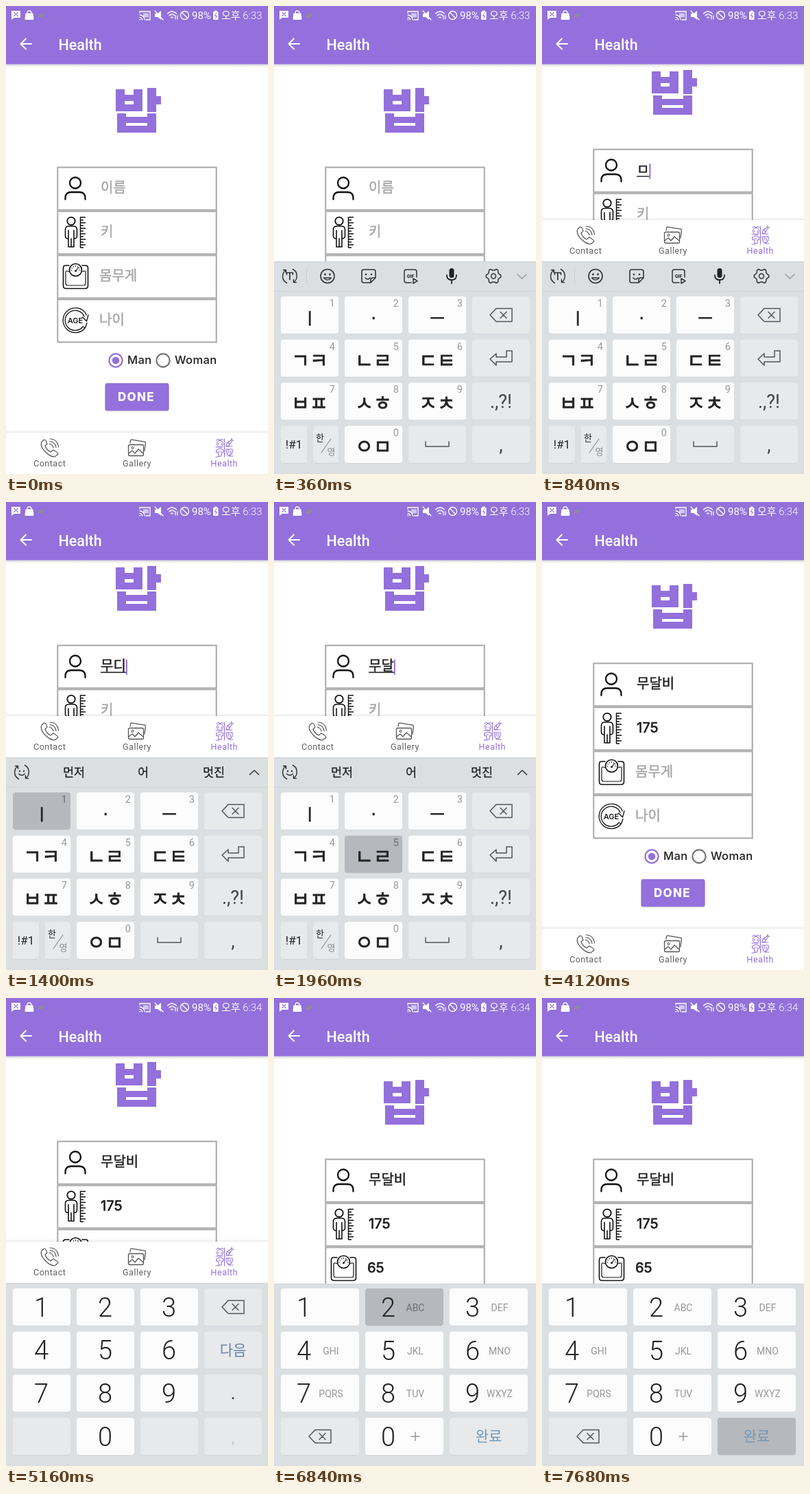
Recreate the animation shown at these times as an HTML page. Size 382 px wide and 680 px high, loop 7.72 s.

```html
<!DOCTYPE html>
<html lang="ko">
<head>
<meta charset="utf-8">
<title>Health form</title>
<style>
html, body { margin: 0; width: 100%; height: 100%; overflow: hidden; background: #fff; }
svg { display: block; width: 382px; height: 680px; }
text { font-family: Roboto, 'Noto Sans CJK KR', 'Noto Sans KR', sans-serif; fill: #222; }
.form text { font: 500 20px Inter, 'Noto Sans CJK KR', 'Noto Sans KR', sans-serif; fill: #1c1c1c; }
.form .value { stroke: #1c1c1c; stroke-width: .4px; }
.form .hint { font-weight: 400; fill: #a4a4a4; stroke: #a4a4a4; stroke-width: .4px; }
.form .radio { font-size: 16.5px; letter-spacing: .4px; }
.form .done { font-size: 17px; font-weight: 800; letter-spacing: 1.3px; fill: #fff; }
.form .age { font-size: 11px; font-weight: 600; }
.line { fill: none; stroke-linecap: round; stroke-linejoin: round; }
.mid { text-anchor: middle; }
.end { text-anchor: end; }
.bar text { fill: #fff; }
.nav text { font-size: 12.5px; letter-spacing: .5px; fill: #5f5f5f; }
.nav .on { fill: #9370db; }
.key { fill: #fcfcfc; }
.fn { fill: #e7e9eb; }
.key.down { fill: #b5b8bc; }
.jamo, .vowel { font-size: 29px; stroke: #222; stroke-width: .8px; }
.vowel { font-size: 23px; }
.mark { font-size: 27px; fill: #444; }
.num { font-size: 38px; font-weight: 300; }
.sub { font-size: 14.5px; fill: #0006; }
.abc { font-size: 14px; fill: #0006; }
.next { font-size: 21px; fill: #6682ac; }
.word { font-size: 17.5px; stroke: #222; stroke-width: .3px; }
.small { font-size: 13px; }
</style>
</head>
<body>
<svg id="stage" viewBox="0 0 382 680"></svg>
<script>
const PURPLE = '#9370db', INK = '#111', LOOP = 7720, STEP = 40;
const COLS = [10, 103, 196, 289], ROWS = [422, 484.7, 547.3, 610];

const rect = (x, y, w, h, fill, r = 0) =>
  `<rect x="${x}" y="${y}" width="${w}" height="${h}" rx="${r}" fill="${fill}"/>`;
const line = (d, color = INK, width = 2) =>
  `<path class="line" d="${d}" stroke="${color}" stroke-width="${width}"/>`;
const ring = (x, y, r, color = INK, width = 2) =>
  `<circle class="line" cx="${x}" cy="${y}" r="${r}" stroke="${color}" stroke-width="${width}"/>`;
const dot = (x, y, r, fill) => `<circle cx="${x}" cy="${y}" r="${r}" fill="${fill}"/>`;
const text = (x, y, s, cls = '', id = '') =>
  `<text x="${x}" y="${y}" class="${cls}"${id && ` id="${id}"`}>${s}</text>`;
const range = n => [...Array(n).keys()];

// Form
const title = () => `<g role="img" aria-label="밥" fill="${PURPLE}" fill-rule="evenodd">
  <path d="M160 121h13v8h13v-8h13v32h-39zM173 138v5h13v-5z"/>
  <path d="M206 119h13v12h7v12h-7v11h-13z"/>
  <path d="M162 156h13v5h31v-5h13v28h-57zM175 170v4h31v-4z"/></g>`;

const personIcon = () => ring(101, 257, 8, INK, 2.3) +
  line('M86.5 281v-2q0-8.5 8.5-8.5h12q8.5 0 8.5 8.5v2', INK, 2.3);

const heightIcon = () => ring(95, 312.5, 5.7, INK, 1.8) +
  line('M91 350v-12q-4.5 0-4.5-4v-9q0-5 5-5h7q5 0 5 5v9q0 4-4.5 4v12zM91 326v12M99 326v12M95 338v12', INK, 1.6) +
  line('M108.5 307v44' + range(12).map(i => `M108.5 ${307 + i * 4}h${i % 2 ? 4 : 7}`).join(''), INK, 1.5);

const scaleIcon = () =>
  line('M92 377h-5q-3.5 0-3.5 3.5v26q0 4 4 4h28q4 0 4-4v-26q0-3.5-3.5-3.5h-5', INK, 1.6) +
  line('M92 386q-4-2-5 0v16q0 4 3 4h23q3 0 3-4v-16q-1-2-5 0', INK, 1.2) +
  ring(101.5, 383.5, 9, INK, 1.6) + dot(101.5, 385, 1.4, INK) + line('M101.5 385l4-5', INK, 1.2) +
  range(7).map(i => {
    const a = Math.PI * (1 + i / 6), c = Math.cos(a), s = Math.sin(a);
    return line(`M${101.5 + 5.5 * c} ${384 + 5.5 * s}l${c} ${s}`, INK, 1);
  }).join('');

const ageIcon = () =>
  line('M117.5 449a18 18 0 1 0-2 18.5M114 451a14.500 14.500 0 1 0-2 15M111.500 452l6 6 2.500-9M112 466l3.500 1.500 2.500-7', INK, 1.3) +
  text(101, 460.5, 'AGE', 'age mid');

const HINTS = [[138, '이름'], [138, '키'], [136, '몸무게'], [136, '나이']];
const form = () => `<g class="form" id="form">` + title() +
  HINTS.map(([x, s], i) => {
    const y = 234.4 + 64 * i;
    return `<rect x="75.3" y="${y}" width="231.4" height="62" fill="#fff" stroke="#a9a9a9" stroke-width="2"/>` +
      text(x, y + 36.6, s, 'hint', 'hint' + i) + text(x, y + 36.6, '', 'value', 'value' + i);
  }).join('') +
  personIcon() + heightIcon() + scaleIcon() + ageIcon() +
  `<path id="under" stroke="${INK}" stroke-width="1.3"/>` +
  `<rect id="caret" y="255" width="2" height="22" fill="${PURPLE}"/>` +
  ring(160, 515, 9.6, PURPLE, 2.2) + dot(160, 515, 5.2, PURPLE) + text(177, 520, 'Man', 'radio') +
  ring(229, 515, 9.6, '#757575', 2.2) + text(246, 520, 'Woman', 'radio') +
  rect(144, 549, 94, 40.5, '#0002', 4) + rect(144.5, 548, 93, 40, PURPLE, 3) +
  text(163, 573.5, 'DONE', 'done') + '</g>';

// App bar and bottom navigation
const statusIcons = () =>
  `<path d="M8 7h13v10h-9l-4 3z" fill="#fff"/>` + line('M12 9.500l5 5M17 9.500l-5 5', PURPLE, 1.2) +
  `<path d="M28.500 10.500h11l1 8q0 1.500-1.500 1.500h-10q-1.500 0-1.500-1.500z" fill="#fff"/>` +
  line('M31 12v-2q0-3 3-3t3 3v2', '#fff', 1.3) +
  `<text x="47" y="16" style="font:italic 700 7px Roboto,sans-serif;fill:#8aa06a">gif</text>` +
  line('M195 10v-2h15v12h-6M195 13a7 7 0 0 1 7 7M195 16.500a3.500 3.500 0 0 1 3.500 3.500', '#fff', 1.3) +
  rect(200, 10.5, 8, 6, '#fff9') + dot(195.5, 19.5, 1, '#fff') +
  `<path d="M217 11h4l5-4v13l-5-4h-4z" fill="#fff"/>` + line('M217 7l12 13', '#fff', 1.3) +
  line('M235.500 11q6.500-6 13 0M238 14q4-4 8 0M240.500 17q1.500-1.500 3 0M247 14v5M250 19v-5', '#fff', 1.3) +
  ring(260.5, 13.5, 6, '#fff', 1.3) + line('M256.500 9.500l8 8', '#fff', 1.3) +
  rect(302, 8, 7.5, 12, '#fff', 1) + rect(304, 6.5, 3.5, 2, '#fff') + line('M306.500 10.500l-2 4h3l-2 3.500', PURPLE, 1);

const bar = () => `<g class="bar">` +
  rect(0, 84.6, 382, 4.5, 'url(#shade)') + rect(0, 0, 382, 84.6, PURPLE) + statusIcons() +
  `<text x="271" y="19" font-size="15">98%</text>
   <text x="314" y="19" font-size="15" font-weight="300" id="clock"></text>
   <text x="76.5" y="63.5" font-size="21.5" font-weight="500">Health</text>` +
  line('M37 55H22M29 47.500L21.500 55l7.500 7.500', '#fff', 2) + '</g>';

const healthIcon = () => {
  const p = d => line(d, PURPLE, 1.1);
  return ring(312, 636, 4.5, PURPLE, 1.1) + p('M307 631q3-3 5 0 3-3 5 0M310 635v2M314 636v2M306 641h10') +
    p('M318.500 629v26M321 640l1-5 7-5 1 1-5 8zM329 630v-2M330 631h2M324 635l2 2M322 640h8') +
    p('M306.500 647q0-3 3-3 3-2 5 0 3 0 2.500 3 0 2-3 2v5h-4v-5q-3.500 0-3.500-2zM310 647h3') +
    p('M321 644h9q1 7-4 9-5 0-5-9zM324 644v5M327 646v4M324 654h7M306 655h5');
};
const nav = () => `<g class="nav" id="nav">` +
  rect(0, 617, 382, 3, '#0000000a') + rect(0, 619, 382, 1, '#0000000c') + rect(0, 620, 382, 60, '#fff') +
  line('M56 630l-4 3c-4 8 10 22 19 22l5-4q0-2-7-6l-4 3q-6-3-8-9l3-3q-2-6-4-6zM63 636q5 1 6 6M64 632.500q8 1 9 9M64 629q11 0 12.500 12', '#555', 1.2) +
  line('M180.500 637.500h18q2 0 2 2v12q0 2-2 2h-18q-2 0-2-2v-12q0-2 2-2zM181 635l.5-3.500q.3-1.700 2-1.400l18.500 3q1.700.3 1.400 2l-1.400 11', '#555', 1.3) +
  line('M179 650l5-4 4 4 5-6 7 6', '#555', 1.3) +
  ring(184.5, 642, 1.5, '#555', 1.1) + healthIcon() +
  text(63.7, 669, 'Contact', 'mid') + text(191, 669, 'Gallery', 'mid') + text(318.3, 669, 'Health', 'mid on') + '</g>';

// Keyboards
const key = (id, x, row, label, fn, w = 84) =>
  rect(x + .5, ROWS[row] + 1, w - 1, 53.7, '#cfd2d5', 4) +
  `<rect class="key${fn ? ' fn' : ''}" id="${id}" x="${x}" y="${ROWS[row]}" width="${w}" height="54" rx="4"/>` + label;
const eraser = (x, y) =>
  line(`M${x - 16} ${y}l9-9.5h23v19h-23zM${x - 1} ${y - 4.5}l9 9M${x + 8} ${y - 4.5}l-9 9`, '#555', 1.5);
const board = (id, top, body) =>
  `<g id="${id}">` + rect(0, top, 382, 680 - top, '#dcdfe2') + rect(0, top, 382, 1, '#cfd2d5') + body + '</g>';

const JAMO = ['ㅣ', 'ㆍ', 'ㅡ', 'ㄱㅋ', 'ㄴㄹ', 'ㄷㅌ', 'ㅂㅍ', 'ㅅㅎ', 'ㅈㅊ', 'ㅇㅁ'];
const place = i => i < 9 ? [i % 3, i / 3 | 0] : [1, 3];

const gear = (x, y) => line('M' + range(24).map(i => {
  const a = (i - .5) * Math.PI / 12, r = i % 4 < 2 ? 10.8 : 8.6;
  return `${x + r * Math.cos(a)} ${y + r * Math.sin(a)}`;
}).join('L') + 'z', '#333', 1.5) + ring(x, y, 3.4, '#333', 1.5);

const tools = () => {
  const ink = '#333';
  return line('M18.500 402.500A11 11 0 0 1 17 384M13.500 383.500h4v4M27.500 382.500A11 11 0 0 1 29 401M32.500 401.500h-4v-4', ink, 1.5) +
    `<g id="tools">` + line('M18.500 390v-2.500h9v2.500M23 388v9.500', ink, 1.7) + rect(47, 381, 1, 24, '#cdd0d3') +
    ring(78, 392.5, 10, ink, 1.6) + dot(74.5, 390, 1.4, ink) + dot(81.5, 390, 1.4, ink) + line('M72.500 395q5.500 6 11 0z', ink, 1.4) +
    line('M131 383h14q3 0 3 3v9l-7 7h-10q-3 0-3-3v-13q0-3 3-3zM148 395h-4q-3 0-3 3v4M133 395q4 4 7 0', ink, 1.6) +
    dot(134, 390, 1.3, ink) + dot(142, 390, 1.3, ink) +
    line('M200 402h-7q-3 0-3-3v-13q0-3 3-3h12q3 0 3 3v8M203 396l6 3.500-6 3.500z', ink, 1.5) +
    `<text class="mid" x="199" y="395" font-size="7" font-weight="700">GIF</text>` +
    rect(255.5, 381, 7, 14, '#222', 3.5) + line('M252 391q0 7 7 7t7-7M259 398v5', '#222', 1.8) +
    gear(320, 392.5) + line('M355 390l6.500 6 6.500-6', '#999', 1.5) + '</g>' +
    `<g id="words">` + dot(20, 391, 1.2, ink) + dot(26, 391, 1.2, ink) + line('M18.500 395q4.500 4 9 0', ink, 1.4) +
    text(99, 399, '먼저', 'word mid') + text(200, 399, '어', 'word mid') + text(303, 399, '멋진', 'word mid') +
    line('M355.500 396l6.500-6 6.500 6', ink, 1.6) + '</g>';
};

const hangul = () => board('hangul', 371, rect(0, 414, 382, 1, '#d3d6d9') + tools() +
  JAMO.map((s, i) => {
    const [c, r] = place(i), x = COLS[c], y = ROWS[r], n = (i + 1) % 10;
    const label = i < 3 ? text(x + 42, y + 40, s, 'vowel mid') : text(x + 42, y + 41, s, 'jamo mid');
    return key('k' + n, x, r, label + text(x + 79, y + 15, n, 'sub end'));
  }).join('') +
  key('kDel', 289, 0, eraser(331, 449), 1) +
  key('kEnter', 289, 1, line('M315 513l9-8v5h15v-9h8v16h-23v5z', '#555', 1.5), 1) +
  key('kMark', 289, 2, text(331, 584, '.,?!', 'mark mid'), 1) +
  key('kSym', 10, 3, `<text class="mid" x="29" y="643" font-size="17">!#1</text>`, 1, 38) +
  key('kLang', 57, 3, text(67, 632, '한', 'small mid') + text(83.5, 652, '영', 'sub small mid') + line('M69 649l14-20', '#777', 1), 1, 37) +
  key('kSpace', 196, 3, line('M221 633v7h34v-7', '#555', 1.5), 1) +
  key('kComma', 289, 3, text(331, 647, ',', 'mark mid'), 1));

const digits = () => board('digits', 414,
  range(10).map(i => {
    const [c, r] = place(i), n = (i + 1) % 10;
    return key('d' + n, COLS[c], r, text(COLS[c] + 41.5, ROWS[r] + 40.5, n, 'num mid'));
  }).join('') +
  key('dDel', 289, 0, eraser(331, 449), 1) + key('dNext', 289, 1, text(331, 519, '다음', 'next mid'), 1) +
  key('dDot', 289, 2, text(331, 583, '.', 'mark mid'), 1) + key('dA', 10, 3, '', 1) + key('dB', 196, 3, '', 1) +
  key('dC', 289, 3, `<text class="mid" x="331" y="647" font-size="24" style="fill:#c3c6ca">,</text>`, 1));

const LETTERS = ['', 'ABC', 'DEF', 'GHI', 'JKL', 'MNO', 'PQRS', 'TUV', 'WXYZ', '+'];
const phone = () => board('phone', 415,
  LETTERS.map((s, i) => {
    const [c, r] = place(i), x = 10 + 123 * c, y = ROWS[r], n = (i + 1) % 10;
    const sub = s === '+'
      ? line(`M${x + 67} ${y + 27}h12m-6-6v12`, '#999', 1.5)
      : text(x + 73, y + 33, s, 'abc mid');
    return key('p' + n, x, r, text(x + 33.5, y + 41, n, 'num mid') + sub, 0, 114);
  }).join('') +
  key('pDel', 10, 3, eraser(67, 637), 1, 114) +
  key('pDone', 256, 3, `<text class="mid" x="313" y="644" font-size="21" style="fill:#7098b5">완료</text>`, 1, 114));

const stage = document.getElementById('stage');
stage.innerHTML = `<defs><linearGradient id="shade" x2="0" y2="1">
  <stop stop-color="#000" stop-opacity=".15"/><stop offset="1" stop-color="#000" stop-opacity="0"/>
  </linearGradient></defs>` + rect(0, 0, 382, 680, '#fff') + form() + nav() + hangul() + digits() + phone() + bar();
const $ = id => document.getElementById(id);

// Timeline, in ms
const TYPED = [
  [[640, 'ㅇ'], [760, 'ㅁ'], [960, '므'], [1080, '무'], [1240, '무ㄷ'], [1400, '무디'], [1520, '무다'],
   [1720, '무단'], [1960, '무달'], [2080, '무달ㅂ'], [2160, '무달비']],
  [[3360, '1'], [3440, '17'], [3560, '175']],
  [[4960, '6'], [5080, '65']],
  [[6840, '2'], [7200, '25']]
];
const PRESSES = [
  ['k0', 640, 720], ['k0', 760, 840], ['k3', 960, 1040], ['k2', 1080, 1160], ['k6', 1240, 1320],
  ['k1', 1400, 1480], ['k2', 1520, 1600], ['k5', 1720, 1800], ['k5', 1960, 2040], ['k7', 2080, 2160],
  ['k1', 2160, 2240], ['kEnter', 2480, 2560],
  ['d1', 3360, 3400], ['d7', 3440, 3520], ['d5', 3560, 3600], ['dNext', 3760, 3840],
  ['d6', 4960, 5040], ['d5', 5080, 5160], ['dNext', 5280, 5400],
  ['p2', 6840, 6880], ['p5', 7200, 7240], ['pDone', 7600, LOOP]
];
const LIFT = [[0, 0], [400, 309], [2560, 266], [4000, 0], [4680, 266], [5480, 0]];
const FOCUS = [[0, 400, 2560], [1, 2640, 4360]];

const last = (steps, t) => steps.filter(s => s[0] <= t).pop();
const glide = (t, a, b) => 1 - (1 - Math.min(1, Math.max(0, (t - a) / (b - a)))) ** 3;
const within = (t, a, b) => t >= a && t < b;
const shift = (id, y) => $(id).setAttribute('transform', `translate(0 ${y})`);
const show = (id, on) => $(id).setAttribute('visibility', on ? 'inherit' : 'hidden');

function draw(t) {
  const lift = last(LIFT, t)[1];
  shift('nav', -lift);
  shift('form', lift ? -26 : 0);

  show('hangul', t < 2560);
  shift('hangul', 312 * (1 - glide(t, 0, 360)));
  show('digits', within(t, 2560, 4120) || within(t, 4320, 5480));
  shift('digits', 268 * (t < 4200 ? glide(t, 3960, 4120) : 1 - glide(t, 4320, 4640)));
  show('phone', t >= 5480);
  show('tools', t < 1040);
  show('words', t >= 1040);
  $('clock').textContent = t < 4000 ? '오후 6:33' : '오후 6:34';

  TYPED.forEach((steps, i) => {
    const entry = last(steps, t);
    $('value' + i).textContent = entry ? entry[1] : '';
    show('hint' + i, !entry);
  });

  const nameWidth = $('value0').getComputedTextLength();
  $('under').setAttribute('d', t < 2560 && nameWidth ? `M138 273.5h${nameWidth}` : '');

  const focus = FOCUS.find(f => within(t, f[1], f[2]));
  show('caret', false);
  if (focus) {
    const [i, start] = focus, entry = last(TYPED[i], t);
    const since = t - (entry ? entry[0] : start);
    $('caret').setAttribute('x', 138 + $('value' + i).getComputedTextLength());
    $('caret').setAttribute('y', 255 + 64 * i);
    show('caret', since % 1000 < 500);
  }

  const down = new Set(PRESSES.filter(p => within(t, p[1], p[2])).map(p => p[0]));
  for (const k of stage.querySelectorAll('.key')) k.classList.toggle('down', down.has(k.id));
}

const begin = performance.now();
function tick() {
  const t = (performance.now() - begin) % LOOP;
  draw(Math.floor(t / STEP) * STEP);
  requestAnimationFrame(tick);
}
tick();
</script>
</body>
</html>
```
